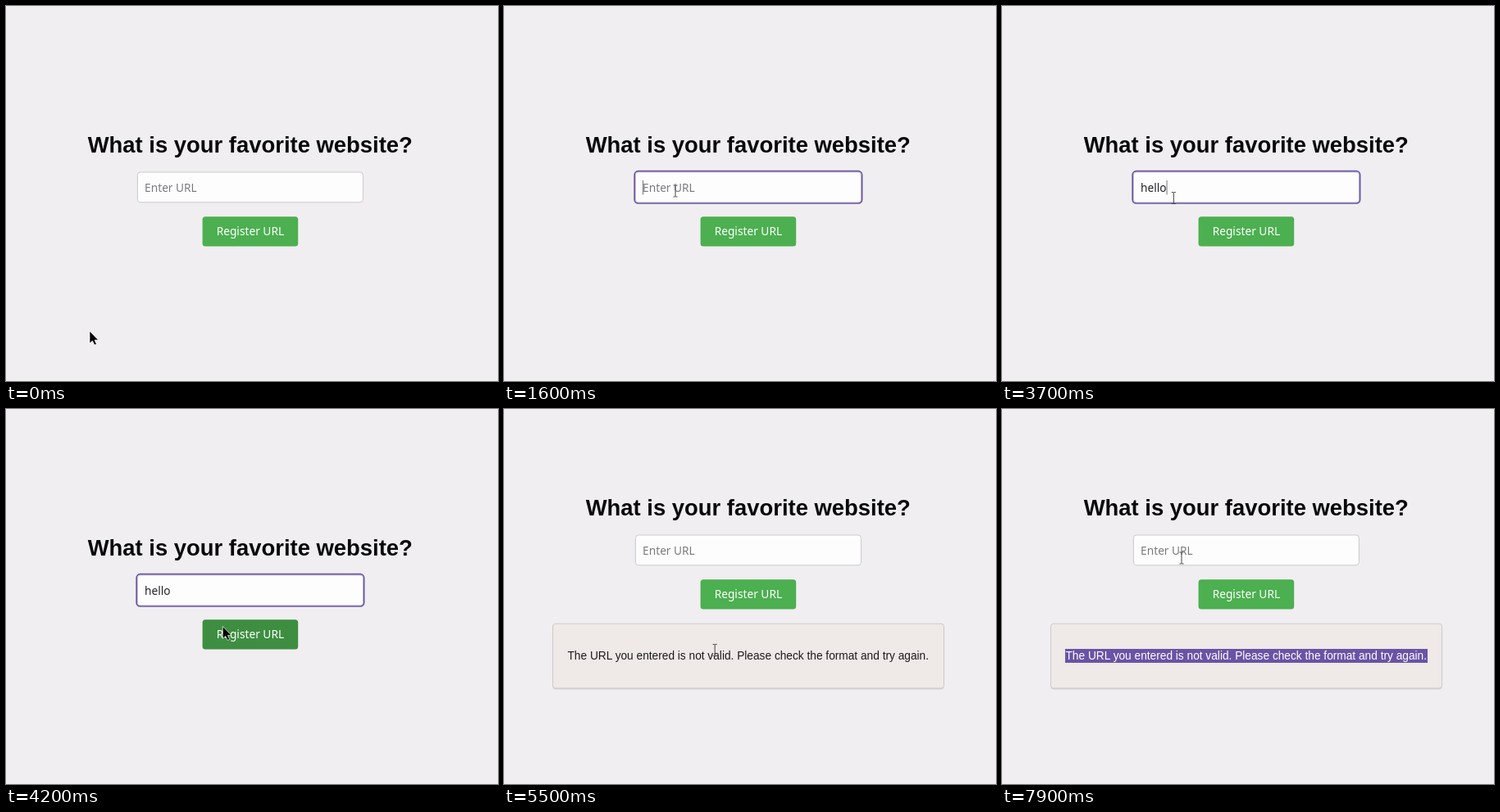
Write an HTML page that moves like this. It is 600 px wide and 458 px high and loops after 8000 ms.

```html
<!DOCTYPE html>
<html lang="en">
<head>
<meta charset="utf-8">
<title>Favorite website form</title>
<style>
  html, body { margin: 0; width: 100%; height: 100%; overflow: hidden; background: #f0eef0; }
  svg { display: block; width: 100%; height: 100%; }
  .title { font: bold 27.43px "Liberation Sans", Arial, sans-serif; fill: #08080c; }
  .ui { font: 13.71px "Noto Sans", sans-serif; }
  .note { font: 13.71px "Liberation Sans", Arial, sans-serif; }
</style>
</head>
<body>
<svg viewBox="0 0 600 458">
  <g id="form">
    <text class="title" x="297.8" y="178.5" text-anchor="middle">What is your favorite website?</text>
    <rect x="160.4" y="203" width="275" height="36.8" rx="3.4" fill="#fefdfe" stroke="#cbc9cd"/>
    <rect id="ring" x="159.2" y="201.7" width="277.4" height="39.3" rx="4.4" fill="none" stroke="#6a53a6" stroke-width="1.7"/>
    <text id="value" class="ui" x="169.1" y="226.5"></text>
    <rect id="caret" y="213" width="1" height="17.5" fill="#77757c"/>
    <rect id="button" x="239.6" y="257.3" width="116.6" height="36.1" rx="3.5"/>
    <text class="ui" x="297.9" y="280.4" text-anchor="middle" fill="#fff">Register URL</text>
  </g>

  <g id="alert">
    <rect x="59.5" y="264" width="477" height="79" rx="4" opacity=".04"/>
    <rect x="59.5" y="263" width="477" height="79.3" rx="3.5" opacity=".08"/>
    <rect x="59.5" y="262.2" width="477" height="78.8" rx="3.4" fill="#efe9e8" stroke="#cdcacc"/>
    <rect id="marked" x="77" y="293" width="442" height="17" fill="#6a53a6"/>
    <text id="message" class="note" x="77.5" y="306">The URL you entered is not valid. Please check the format and try again.</text>
  </g>

  <path id="beam" d="M-2.5 -7h2l.5 .5l.5 -.5h2M0 -6.5V6.5M-2.5 7h2l.5 -.5l.5 .5h2" fill="none" stroke="#444"/>
  <path id="arrow" d="M0 0V15L3.4 12L5.9 17L8.4 15.9L6.1 11H10.6Z" stroke="#fff" stroke-width=".7"/>
</svg>
<script>
  const LOOP = 8000, STEP = 100, LIFT = 49;
  const FOCUS = 1300, TYPE = 2200, BLUR = 4300, FAIL = 4900, MARK = 5900;
  const el = id => document.getElementById(id);

  const HOME = { x: 102, y: 397 };
  // bend bows the path sideways
  const MOVES = [
    { from: 500, to: 1200, x: 209, y: 226, bend: 0 },
    { from: 3450, to: 4300, x: 269, y: 267, bend: -20 },
    { from: 5100, to: 5700, x: 253, y: 304, bend: 0 },
    { from: 6000, to: 6500, x: 242, y: 342, bend: 0 },
    { from: 6700, to: 7000, x: 241, y: 349, bend: 0 },
    { from: 7300, to: 7900, x: 219, y: 182, bend: 25 }
  ];

  const ramp = (t, from, to) => Math.min(1, Math.max(0, (t - from) / (to - from)));
  const ease = k => k * k * (3 - 2 * k);

  function pointerAt(t) {
    return MOVES.reduce((p, move) => {
      const k = ease(ramp(t, move.from, move.to));
      return {
        x: p.x + (move.x - p.x) * k + move.bend * Math.sin(Math.PI * k),
        y: p.y + (move.y - p.y) * k
      };
    }, HOME);
  }

  const inside = (p, left, top, right, bottom) =>
    p.x >= left && p.x <= right && p.y >= top && p.y <= bottom;

  const show = (id, on) => el(id).setAttribute("visibility", on ? "visible" : "hidden");
  const place = (id, x, y) => el(id).setAttribute("transform", `translate(${x} ${y})`);

  function drawForm(t, lift, pointer) {
    place("form", 0, -lift);

    const count = Math.max(0, Math.floor((t - TYPE) / 150) + 1);
    const typed = t < FAIL ? "hello".slice(0, count) : "";
    const value = el("value");
    value.textContent = typed || "Enter URL";
    value.setAttribute("fill", typed ? "#242226" : "#7b797d");

    const focus = ramp(t, FOCUS, FOCUS + 200) - ramp(t, BLUR, BLUR + 200);
    const blinkOn = t < 3100 || (t - 2600) % 1000 < 500;
    el("ring").setAttribute("opacity", focus);
    el("caret").setAttribute("x", 169 + (typed ? value.getComputedTextLength() : 0));
    show("caret", focus === 1 && blinkOn);

    const hover = inside(pointer, 240, 257 - lift, 356, 293 - lift);
    el("button").setAttribute("fill", hover ? "#3e8e41" : "#4caf50");
  }

  function drawAlert(t) {
    const marked = t >= MARK;
    show("alert", t >= FAIL);
    show("marked", marked);
    el("message").setAttribute("fill", marked ? "#fff" : "#1c1b1d");
  }

  function drawPointer(t, lift, pointer) {
    const overText = inside(pointer, 160, 203 - lift, 436, 240 - lift) ||
      t >= FAIL && inside(pointer, 76, 288, 520, 315);
    show("beam", overText);
    show("arrow", !overText);
    place(overText ? "beam" : "arrow", pointer.x, pointer.y);
  }

  function draw(t) {
    const lift = t >= FAIL ? LIFT : 0;
    const pointer = pointerAt(t);
    drawForm(t, lift, pointer);
    drawAlert(t);
    drawPointer(t, lift, pointer);
  }

  const start = performance.now();
  function tick() {
    const t = (performance.now() - start) % LOOP;
    draw(Math.floor(t / STEP) * STEP);
    requestAnimationFrame(tick);
  }
  tick();
</script>
</body>
</html>
```
